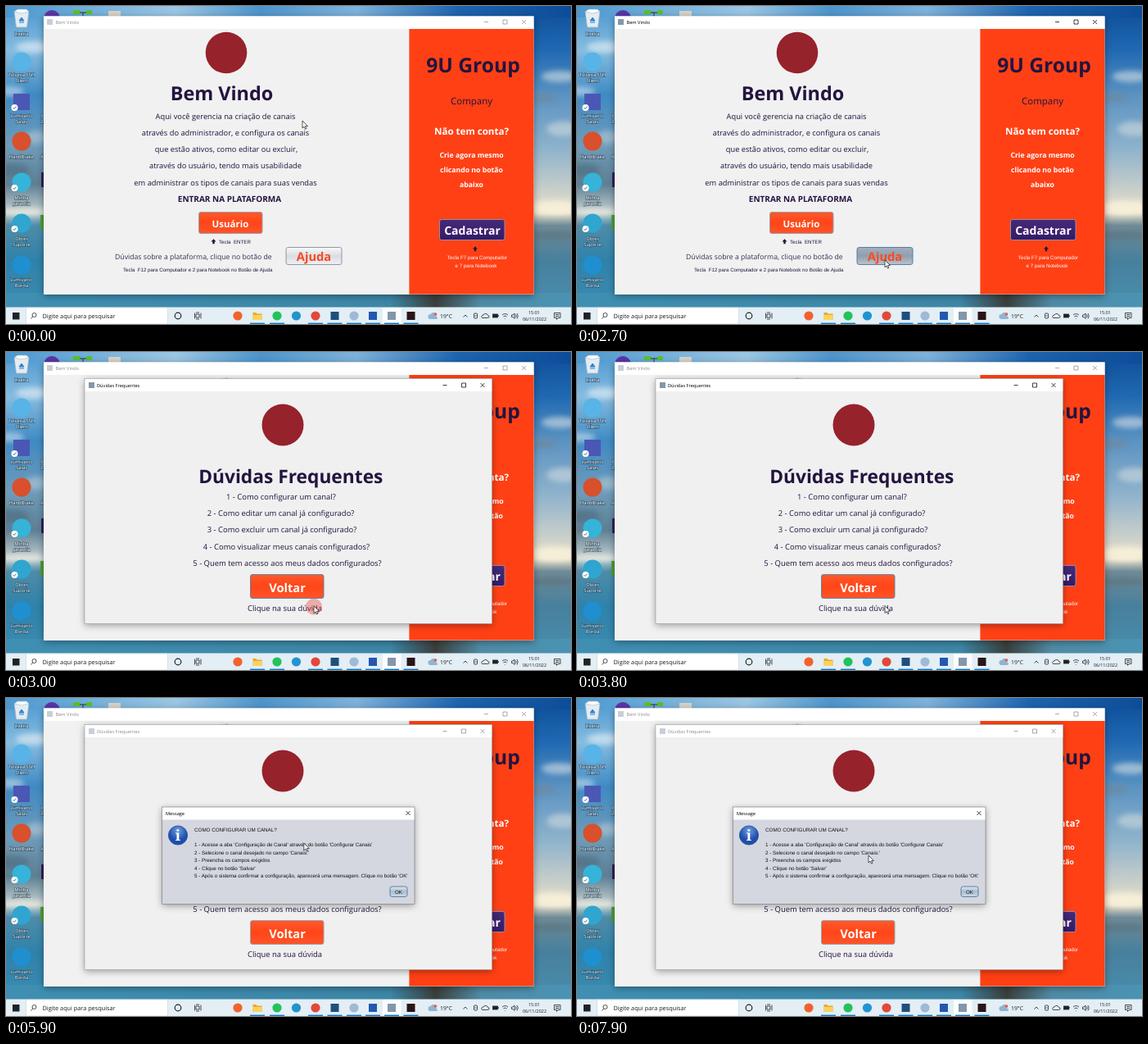
An HTML page for the animation above (8 s loop, 690x388 px).

```html
<!DOCTYPE html>
<html lang="pt">
<head>
<meta charset="utf-8">
<title>Bem Vindo</title>
<style>
html, body { margin: 0; width: 100%; height: 100%; overflow: hidden; }
svg { display: block; width: 690px; height: 388px; }
text { font-family: "Open Sans", "Noto Sans", sans-serif; fill: #23143f; text-rendering: geometricPrecision; white-space: pre; }
.b { font-weight: 700; }
.m { text-anchor: middle; }
.w { fill: #fff; }
.k { fill: #1c1c1c; }
.ar { font-family: "Liberation Sans", Arial, sans-serif; }
.t { font-size: 5.65px; fill: #000; }
.p { font-size: 9.3px; }
.q { font-size: 9.44px; }
.s { font-size: 6.2px; }
.d { font-size: 6.25px; fill: #111; }
.c { fill: none; stroke: #111; stroke-width: .8; }
.n { fill: none; stroke: #222; stroke-width: .8; }
.win { filter: drop-shadow(0 2px 4px rgba(0, 0, 0, .36)); }
.label text { font-size: 5.8px; fill: #fff; text-anchor: middle; paint-order: stroke; stroke: #12283a; stroke-opacity: .55; stroke-width: 1.3px; }
</style>
</head>
<body>
<svg viewBox="0 0 690 388">
  <defs>
    <linearGradient id="west" x2="0" y2="1">
      <stop offset="0" stop-color="#4a97cf"/>
      <stop offset=".14" stop-color="#86bce0"/>
      <stop offset=".28" stop-color="#3f8ac3"/>
      <stop offset=".44" stop-color="#6f9cba"/>
      <stop offset=".56" stop-color="#5d7f93"/>
      <stop offset=".65" stop-color="#c3d0d2"/>
      <stop offset=".69" stop-color="#4f8ca8"/>
      <stop offset=".8" stop-color="#2f82aa"/>
      <stop offset="1" stop-color="#3f8fb3"/>
    </linearGradient>
    <linearGradient id="east" x2="0" y2="1">
      <stop offset="0" stop-color="#0d4c98"/>
      <stop offset=".14" stop-color="#2069b2"/>
      <stop offset=".28" stop-color="#5b93c2"/>
      <stop offset=".45" stop-color="#8fb3cc"/>
      <stop offset=".58" stop-color="#c9cfca"/>
      <stop offset=".65" stop-color="#e9e2cb"/>
      <stop offset=".69" stop-color="#6f8b97"/>
      <stop offset=".8" stop-color="#47809d"/>
      <stop offset="1" stop-color="#4a93b4"/>
    </linearGradient>
    <linearGradient id="north">
      <stop offset="0" stop-color="#4a97cf"/>
      <stop offset=".3" stop-color="#9cc6e2"/>
      <stop offset=".45" stop-color="#4d94cb"/>
      <stop offset=".62" stop-color="#7fb2da"/>
      <stop offset=".8" stop-color="#1d64af"/>
      <stop offset="1" stop-color="#0d4c98"/>
    </linearGradient>
    <linearGradient id="south">
      <stop offset="0" stop-color="#3f8fb3"/>
      <stop offset=".68" stop-color="#3d86a6"/>
      <stop offset=".76" stop-color="#3a3f3c"/>
      <stop offset=".84" stop-color="#4f8ba4"/>
      <stop offset="1" stop-color="#4a93b4"/>
    </linearGradient>
    <linearGradient id="orange" x2="0" y2="1">
      <stop offset="0" stop-color="#ff5a2e"/>
      <stop offset=".5" stop-color="#ff4517"/>
      <stop offset="1" stop-color="#ff552a"/>
    </linearGradient>
    <linearGradient id="violet" x2="0" y2="1">
      <stop offset="0" stop-color="#47297a"/>
      <stop offset="1" stop-color="#351a66"/>
    </linearGradient>
    <linearGradient id="grey" x2="0" y2="1">
      <stop offset="0" stop-color="#f8f9fa"/>
      <stop offset=".5" stop-color="#d9dde3"/>
      <stop offset="1" stop-color="#eef0f3"/>
    </linearGradient>
    <linearGradient id="dark" x2="0" y2="1">
      <stop offset="0" stop-color="#a3afbd"/>
      <stop offset=".5" stop-color="#909eae"/>
      <stop offset="1" stop-color="#b9c4cf"/>
    </linearGradient>
    <linearGradient id="steel" x2="0" y2="1">
      <stop offset="0" stop-color="#dfe8f0"/>
      <stop offset=".5" stop-color="#a9bccf"/>
      <stop offset="1" stop-color="#cbdbe8"/>
    </linearGradient>
    <radialGradient id="info" cy=".25">
      <stop offset="0" stop-color="#6d9de0"/>
      <stop offset="1" stop-color="#1e4fae"/>
    </radialGradient>
    <filter id="soft" x="-50%" y="-50%" width="200%" height="200%"><feGaussianBlur stdDeviation="3"/></filter>
    <path id="up" d="M0 -3.2L3 .1H1.2V2.8H-1.2V.1H-3Z"/>
  </defs>

  <!-- wallpaper -->
  <rect width="345" height="388" fill="url(#west)"/>
  <rect x="345" width="345" height="388" fill="url(#east)"/>
  <rect width="690" height="14" fill="url(#north)"/>
  <rect y="350" width="690" height="20" fill="url(#south)"/>
  <g filter="url(#soft)">
    <ellipse cx="34" cy="50" rx="22" ry="7" fill="#dbe9f2" opacity=".7"/>
    <ellipse cx="4" cy="104" rx="18" ry="6" fill="#b9d5e8" opacity=".7"/>
    <ellipse cx="38" cy="160" rx="14" ry="8" fill="#b4c9d6" opacity=".6"/>
    <ellipse cx="8" cy="200" rx="20" ry="8" fill="#4d6b7e" opacity=".6"/>
    <ellipse cx="22" cy="251" rx="30" ry="4" fill="#f1efe2" opacity=".7"/>
    <ellipse cx="676" cy="86" rx="22" ry="7" fill="#c2d3df" opacity=".7"/>
    <ellipse cx="656" cy="112" rx="16" ry="6" fill="#71879a" opacity=".6"/>
    <ellipse cx="680" cy="150" rx="20" ry="9" fill="#c4d2da" opacity=".7"/>
    <ellipse cx="670" cy="246" rx="30" ry="9" fill="#fbf3dc" opacity=".8"/>
    <ellipse cx="668" cy="280" rx="34" ry="5" fill="#5c6f78" opacity=".6"/>
  </g>

  <!-- desktop -->
  <circle cx="56" cy="15" r="10" fill="#5b36a8"/>
  <path d="M86 8H102M94 8V13" stroke="#1c3c22" fill="none"/>
  <path d="M82 5h8v5h-8zM98 5h7v5h-7z" fill="#57c32c"/>
  <rect x="125" y="6" width="15" height="8" fill="#d8d3c8"/>
  <rect x="43" y="203" width="4" height="18" fill="#33205c"/>
  <rect x="42" y="255" width="4" height="18" fill="#4fa03a"/>
  <path d="M10 7L28 7 25.500 26H12.500Z" fill="#e4ecf2" stroke="#9eb2c2" stroke-width=".7"/>
  <path d="M10 7L14 4 25 4 28 7 19 9Z" fill="#fafcfd" stroke="#a9bac8" stroke-width=".6"/>
  <path d="M16 18l3-4 3 4zM16 20h6" fill="#2f82cf" stroke="#2f82cf"/>
  <g id="icons"></g>
  <g id="labels" class="label"></g>

  <!-- main window -->
  <rect class="win" x="46" y="12.500" width="598.500" height="339.500" fill="#f1f1f1"/>
  <rect x="46" y="12.500" width="598.500" height="15.500" fill="#fff"/>
  <rect x="492.400" y="28" width="152" height="323.600" fill="#ff4015"/>
  <g id="mainBar">
    <rect x="50" y="16" width="7" height="7" fill="#8496ab"/>
    <text class="t" x="60.500" y="22">Bem Vindo</text>
    <path class="c" d="M584 19.500h5M607 17h5v5h-5zM630 17l5 5m0-5l-5 5"/>
  </g>
  <circle cx="269" cy="57" r="25.300" fill="#96222c"/>
  <text class="b m" x="263.500" y="114.500" font-size="23.400">Bem Vindo</text>
  <g class="m">
    <text class="p" x="268" y="137.700">Aqui você gerencia na criação de canais</text>
    <text class="p" x="268" y="157.900">através do administrador, e configura os canais</text>
    <text class="p" x="269" y="178.100">que estão ativos, como editar ou excluir,</text>
    <text class="p" x="268" y="198.300">através do usuário, tendo mais usabilidade</text>
    <text class="p" x="268" y="218.500">em administrar os tipos de canais para suas vendas</text>
    <text class="b" x="273" y="238.500" font-size="10">ENTRAR NA PLATAFORMA</text>
  </g>
  <rect x="235.500" y="251.500" width="77.500" height="26" rx="2.500" fill="url(#orange)" stroke="#98a0aa"/>
  <text class="b m w" x="274" y="269.500" font-size="11.500">Usuário</text>
  <use href="#up" x="253.500" y="287.500" fill="#23143f"/>
  <text class="ar s" x="260" y="290">Tecla  ENTER</text>
  <text x="133" y="309" font-size="8.700" style="fill:#3a2e52">Dúvidas sobre a plataforma, clique no botão de</text>
  <rect id="help" x="342" y="294.500" width="68" height="21" rx="2.500"/>
  <text class="b m" x="376" y="311" font-size="14.700" style="fill:#fb4a20">Ajuda</text>
  <text class="ar" x="143" y="324" font-size="6.170">Tecla  F12 para Computador e 2 para Notebook no Botão de Ajuda</text>

  <text class="b m" x="570.500" y="80.500" font-size="24.600">9U Group</text>
  <text class="m" x="568.500" y="119.500" font-size="11.450">Company</text>
  <g class="b m">
    <text class="w" x="568.500" y="157" font-size="11.570">Não tem conta?</text>
    <text class="w" x="568.500" y="185.300" font-size="8.700">Crie agora mesmo</text>
    <text class="w" x="568.500" y="203" font-size="8.700">clicando no botão</text>
    <text class="w" x="568.500" y="220.500" font-size="8.700">abaixo</text>
  </g>
  <rect x="529.500" y="260.500" width="79.500" height="25" rx="2.500" fill="url(#violet)" stroke="#8f93a8"/>
  <text class="b m w" x="569.500" y="278.700" font-size="14">Cadastrar</text>
  <use href="#up" x="573" y="296.500" fill="#23143f"/>
  <text class="ar s m w" x="575.500" y="308.700">Tecla F7 para Computador</text>
  <text class="ar s m w" x="574" y="318.700">e 7 para Notebook</text>

  <!-- questions window -->
  <g id="faq">
    <rect class="win" x="96" y="32.500" width="497.500" height="299" fill="#f0f0f0"/>
    <rect x="96" y="32.500" width="497.500" height="15.500" fill="#fff"/>
    <rect x="96" y="32.500" width="497.500" height="299" fill="none" stroke="#9a9a9a" stroke-width=".6"/>
    <g id="faqBar">
      <rect x="101" y="37" width="7" height="7" fill="#8496ab"/>
      <text class="t" x="111" y="42.500">Dúvidas Frequentes</text>
      <path class="c" d="M533.500 40.500h5M556.500 38h5v5h-5zM579.500 38l5 5m0-5l-5 5"/>
    </g>
    <circle cx="338" cy="89" r="25.500" fill="#96222c"/>
    <text class="b m" x="347.800" y="160" font-size="22.750">Dúvidas Frequentes</text>
    <text class="q" x="269" y="180">1 - Como configurar um canal?</text>
    <text class="q" x="245.700" y="200.200">2 - Como editar um canal já configurado?</text>
    <text class="q" x="245.700" y="220.400">3 - Como excluir um canal já configurado?</text>
    <text class="q" x="240.700" y="240.700">4 - Como visualizar meus canais configurados?</text>
    <text class="q" x="228.300" y="261">5 - Quem tem acesso aos meus dados configurados?</text>
    <rect id="back" x="298.500" y="271.500" width="89.500" height="29" rx="2.500" fill="url(#orange)"/>
    <text class="b m w" x="343.500" y="292.500" font-size="14.700">Voltar</text>
    <text class="q" x="295" y="315.700">Clique na sua dúvida</text>
  </g>

  <!-- message -->
  <g id="msg">
    <rect class="win" x="190.500" y="133" width="308.500" height="118.500" fill="#d4d7df"/>
    <rect x="190.500" y="133" width="308.500" height="15.500" fill="#fff"/>
    <rect x="190.500" y="133" width="308.500" height="118.500" fill="none" stroke="#777" stroke-width=".6"/>
    <text class="t" x="195" y="143">Message</text>
    <path class="c" d="M488.500 138l5 5m0-5l-5 5"/>
    <circle cx="210" cy="167.500" r="11.600" fill="url(#info)" stroke="#2a4f94" stroke-width=".8"/>
    <text class="b m w" x="210" y="174" font-size="18" style="font-family:'Noto Serif',serif">i</text>
    <text class="ar d" x="230" y="162.500">COMO CONFIGURAR UM CANAL?</text>
    <text class="ar d" x="230" y="181">1 - Acesse a aba 'Configuração de Canal' através do botão 'Configurar Canais'</text>
    <text class="ar d" x="230" y="190.500">2 - Selecione o canal desejado no campo 'Canais:'</text>
    <text class="ar d" x="230" y="200.200">3 - Preencha os campos exigidos</text>
    <text class="ar d" x="230" y="209.800">4 - Clique no botão 'Salvar'</text>
    <text class="ar d" x="230" y="219.300">5 - Após o sistema confirmar a configuração, aparecerá uma mensagem. Clique no botão 'OK'</text>
    <rect x="469" y="230" width="21" height="12.500" rx="2.500" fill="url(#steel)" stroke="#5f7f9f"/>
    <text class="ar d m" x="479.500" y="238.700">OK</text>
  </g>

  <!-- taskbar -->
  <rect y="367.500" width="690" height="20.500" fill="#e3eef5"/>
  <rect x="24.500" y="368" width="173" height="20" fill="#fff" stroke="#c9d0d6" stroke-width=".6"/>
  <rect x="460" y="368" width="22.500" height="20" fill="#fbfdfe"/>
  <rect x="8" y="374" width="8.500" height="8.500" fill="#1f2328"/>
  <g class="n">
    <circle cx="34.500" cy="377" r="2.500"/><path d="M32.700 379L30.500 381.500"/>
    <circle cx="210" cy="378" r="3.800" stroke-width="1.200"/>
    <path d="M230.500 374.500v7M232 376h4v4h-4zM232 374h4M232 382h4M238 374.500v7"/>
  </g>
  <text class="k" x="44.500" y="380.800" font-size="7.300">Digite aqui para pesquisar</text>
  <g id="apps"></g>
  <path d="M301.500 374h4l1 1.500h6v7.500h-11z" fill="#e9ab2a"/><path d="M301.500 377h11v6h-11z" fill="#fbd25f"/>
  <g fill="#8fb4d4"><circle cx="518.500" cy="379" r="3"/><circle cx="522" cy="377.500" r="3.500"/><rect x="517" y="379" width="10" height="3" rx="1.500"/></g>
  <circle cx="524.500" cy="376" r="1.800" fill="#ee5a3c"/>
  <text class="k" x="530" y="380.600" font-size="6.800">19°C</text>
  <g class="n">
    <path d="M558.500 379.500l2.500-2.500 2.500 2.500"/>
    <rect x="571.500" y="375" width="4" height="6" rx="1"/><path d="M572.500 378h2"/>
    <path d="M581.500 380.500h7a1.500 1.500 0 0 0 0-3 3 3 0 0 0-5.500-.5 2 2 0 0 0-1.500 3.500z"/>
    <rect x="594.500" y="376" width="6" height="4" fill="#222"/><path d="M601.300 377v2"/>
    <path d="M606 377a5 5 0 0 1 7 0M607.500 379a3 3 0 0 1 4 0M609.500 381v.6"/>
    <path d="M617.500 377h1.500l2-2v6.500l-2-2h-1.500zM622.500 376.500q1.500 1.500 0 3.500M624 375q2.500 3 0 6.500"/>
    <path d="M669.500 374.500h7.500v6h-3l-1.500 2v-2h-3zM671 376.500h4.500M671 378.500h4.500"/>
  </g>
  <text class="k m" x="645" y="375.900" font-size="5.500">15:01</text>
  <text class="k m" x="645.500" y="384.400" font-size="5.500">06/11/2022</text>

  <circle id="tap" fill="#e5453d"/>
  <g id="cursor" stroke="#111" stroke-width=".7" fill="#fff" stroke-linejoin="round">
    <path id="arrow" d="M0 0V9L2.100 7.100 3.500 10.200 4.900 9.600 3.600 6.600H6.400Z"/>
    <path id="hand" d="M-.8 .8Q0-.4 .9 .8V4.200Q2 3.600 2.500 4.500 3.600 4 4 5 5.300 4.800 5.300 6V8.500Q5.200 10 4.300 11.500H-.3Q-1.500 9.500-2.800 7.500-2.600 6.100-.8 7.500Z"/>
  </g>
</svg>
<script>
const $ = id => document.getElementById(id);
const clamp = v => Math.max(0, Math.min(1, v));
const set = (id, attrs) => { for (const k in attrs) $(id).setAttribute(k, attrs[k]); };

const shape = (x, y, r, fill, square) => square
  ? `<rect x="${x - r}" y="${y - r}" width="${2 * r}" height="${2 * r}" fill="${fill}"/>`
  : `<circle cx="${x}" cy="${y}" r="${r}" fill="${fill}"/>`;

// desktop: y, colour, square, badge
const icons = [
  [68, '#58b4e6', 0, 0], [117, '#4a57b5', 1, 1], [165, '#d8502c', 0, 0],
  [215, '#35b3d8', 0, 1], [265, '#2fa5cf', 0, 1], [316, '#1f8fd0', 0, 0]
];
$('icons').innerHTML = icons.map(([y, fill, sq, badge]) =>
  shape(19, y, sq ? 10 : 11.5, fill, sq) + (badge
    ? shape(10.5, y + 7, 4, '#fff') + `<path d="M8.500 ${y + 7}l1.500 1.500 2.500-3" fill="none" stroke="#3b4a55" stroke-width=".8"/>`
    : '')).join('');

const labels = [
  [19, 36, 'Lixeira'], [19, 86, 'Tolvexa SSH'], [19, 93, 'Client'],
  [19, 136, 'Lumivarto'], [19, 143.3, 'Salas'], [19, 186, 'HandBrake'],
  [19, 236, 'Minha'], [19, 243.3, 'garantia'], [19, 286, 'Obter'], [19, 293.3, 'Suporte'],
  [19, 336, 'Lumivarto'], [19, 343.3, 'Borda'], [44, 136, 'P'], [44, 143.3, '2'], [44, 186, 'A']
];
$('labels').innerHTML = labels.map(([x, y, s]) => `<text x="${x}" y="${y}">${s}</text>`).join('');

// taskbar: x, colour, square, running
const apps = [
  [283, '#f2622c', 0, 0], [307, 'none', 0, 1], [331, '#23c25a', 0, 1], [354.5, '#2194cf', 0, 0],
  [378, '#e2483a', 0, 1], [401.5, '#1f4f7d', 1, 1], [425, '#9fb9d6', 0, 1], [448, '#2358b0', 1, 1],
  [471, '#8496ab', 1, 1], [494.5, '#2a1416', 1, 1]
];
$('apps').innerHTML = apps.map(([x, fill, sq, on]) =>
  shape(x, 378, sq ? 5 : 5.6, fill, sq) +
  (on ? `<rect x="${x - 9}" y="386.600" width="18" height="1.400" fill="#1378c8"/>` : '')).join('');

// pointer: time, x, y
const track = [
  [0, 362, 140], [500, 362, 140], [1200, 375, 301], [1400, 375, 301], [1500, 375.5, 301.5],
  [1700, 375.5, 301.5], [2000, 376, 304], [2100, 376, 304], [2300, 376, 310], [3700, 376, 309.5],
  [4000, 376, 309.5], [4800, 363.8, 177], [7400, 363.8, 177], [7900, 356, 192], [8000, 356, 192]
];
function pointer(t) {
  const i = track.findIndex((k, n) => n && t <= k[0]);
  const [t0, x0, y0] = track[i - 1], [t1, x1, y1] = track[i];
  const u = (t - t0) / (t1 - t0), e = u * u * (3 - 2 * u);
  return [x0 + (x1 - x0) * e, y0 + (y1 - y0) * e];
}

// window fades in while growing slightly
function open(id, t, start, cx, cy) {
  const e = 1 - (1 - clamp((t - start) / 200)) ** 2, s = 1 - .06 * (1 - e);
  set(id, {
    opacity: e, visibility: e ? 'visible' : 'hidden',
    transform: `translate(${cx} ${cy}) scale(${s}) translate(${-cx} ${-cy})`
  });
}

function draw(t) {
  const [x, y] = pointer(t);
  open('faq', t, 2790, 344.7, 182);
  open('msg', t, 5490, 344.7, 192);

  const active = t < 2800 ? clamp(t / 400) : 0;
  set('mainBar', { opacity: .45 + .55 * active });
  set('faqBar', { opacity: t < 5500 ? 1 : .45 });
  set('back', { stroke: t < 5500 ? '#5f86a6' : '#9aa2ab' });

  const down = t >= 2600 && t < 2800;
  set('help', { fill: down ? 'url(#dark)' : 'url(#grey)', stroke: down ? '#5b7f9f' : '#9097a0' });

  const since = Math.min(...[2700, 5300].map(c => t > c ? t - c : 1e4));
  set('tap', { cx: x, cy: y + 1, r: Math.min(10, 2 + since / 25), opacity: .8 * clamp((400 - since) / 200) });

  const row = (y - 177) / 20.2;
  const hand = t > 3000 && t < 5600 && row > -.4 && row < 4.4 && Math.abs(row - Math.round(row)) < .4;
  set('cursor', { transform: `translate(${x} ${y})` });
  set('hand', { visibility: hand ? 'visible' : 'hidden' });
  set('arrow', { visibility: hand ? 'hidden' : 'visible' });
}

const begin = performance.now();
let last = -1;
function tick() {
  const t = Math.floor(((performance.now() - begin) % 8000) / 100) * 100;
  if (t !== last) draw(last = t);
  requestAnimationFrame(tick);
}
tick();
</script>
</body>
</html>
```
